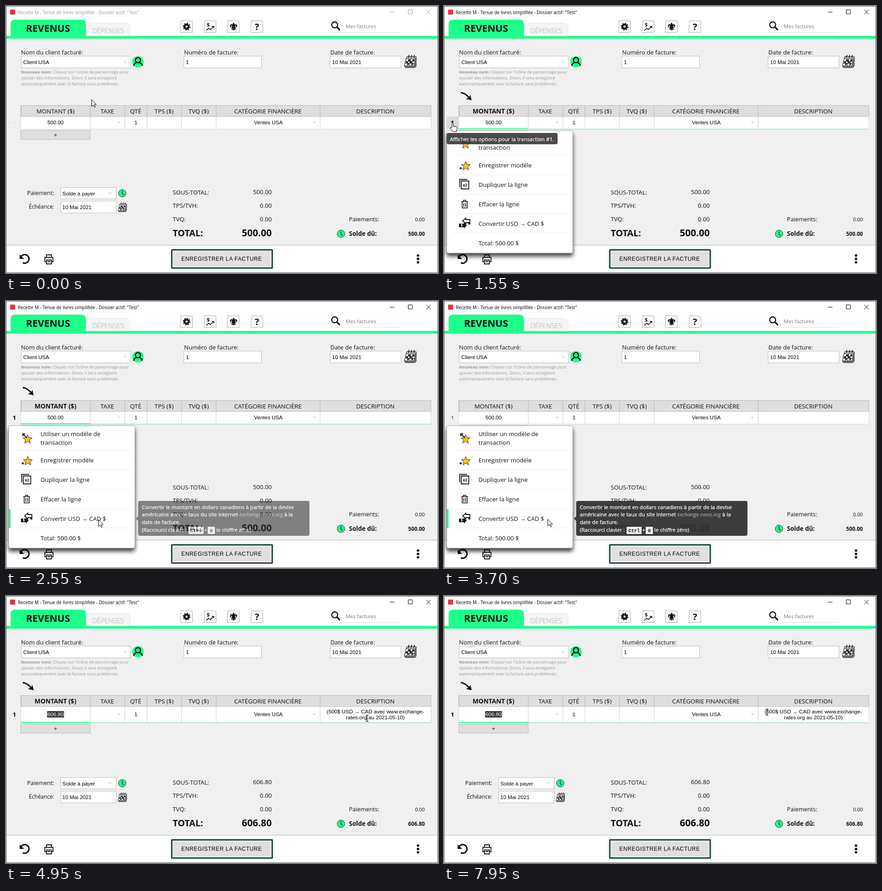
Animation, 951 px wide and 589 px high, one loop 8000 ms. Source, as an HTML page:

```html
<!DOCTYPE html>
<html lang="fr">
<head>
<meta charset="utf-8">
<title>Recette M</title>
<style>
html, body { margin: 0; width: 100%; height: 100%; overflow: hidden; background: #f0f0f0; }
svg { display: block; width: 951px; height: 589px; font: 13.2px "Open Sans", "Noto Sans", sans-serif; fill: #111; }
text { white-space: pre; }
.b { font-weight: 700; }
.m { text-anchor: middle; }
.e { text-anchor: end; }
.f { font: 11.7px "Liberation Sans", Arial, sans-serif; fill: #000; }
.box { fill: #fff; stroke: #bdbdbd; }
.grey { fill: #dedede; stroke: #b8b8b8; }
.ln { fill: none; stroke: #111; }
.tri { fill: #e2e2e2; }
.hint { font-size: 9.24px; fill: #999; }
.head { font-size: 13.4px; }
.tip { font-size: 11.58px; fill: #fff; }
.tip text:not(.key) { stroke: #fff; stroke-width: .3px; }
.tip .bg { fill: #313131; fill-opacity: .94; }
.tip .site { font-style: italic; fill: #bbb; stroke: none; }
.key { font: 700 10.5px "Liberation Mono", monospace; fill: #111; }
#row { stroke: #d8d8d8; }
#menu .sheet { filter: drop-shadow(0 7px 5px #000b); }
#button { filter: drop-shadow(0 0 2px #1dff8b); }
</style>
</head>
<body>
<svg viewBox="0 0 951 589">
  <defs>
    <path id="tri" class="tri" d="M-4 -2h8l-4 5z"/>
    <path id="star" d="M0-10 2.7-3.3 10-3 4.3 1.6 6.3 8.6 0 4.6-6.3 8.6-4.3 1.6-10-3-2.7-3.3z" fill="#ffc61a" stroke="#222"/>
    <g id="clock">
      <circle r="8.3" fill="#1dff8b" stroke="#234"/>
      <path d="M0-5.5V.5L3 4" class="ln" stroke-width="1.4"/>
    </g>
    <g id="calendar">
      <path d="M6 6H27V26L24 29H3L1 25z" fill="#777" stroke="#222"/>
      <path d="M6 5H27L22 25H1z" fill="#fff" stroke="#222"/>
      <path d="M6 5H27L26 9.500H5z" fill="#ccc" stroke="#222"/>
      <path d="M10 11h5l-1 4H9zM19 11h5l-1 4h-5zM13 15h5l-1 4h-5zM5 15h4l-1 4H4zM8 19h4l-1 4H7zM17 19h4l-1 4h-4z" fill="#222"/>
      <path d="M10 10 7 25M15 10 12 25M20 10 17 25M4 15H25M3 19.500H24" class="ln" stroke-width=".7"/>
      <path d="M10 7 11 1M16 7 17 1M22 7 23 1" class="ln" stroke-width="1.8"/>
    </g>
    <path id="frame" d="M1 0 26 1 27 26 0 27z" fill="#fbfbfb" stroke="#aaa"/>
  </defs>

  <!-- window -->
  <rect width="951" height="589" fill="#f0f0f0"/>
  <path d="M0 0H951V68H0zM0 528H951V589H0z" fill="#fff"/>
  <path d="M0 527.5H951" stroke="#b5b5b5"/>
  <path d="M0 66H951V72H0z" fill="#1dff8b"/>
  <rect x="9" y="8" width="11" height="11" fill="#e8323c"/>
  <g id="bar">
    <text x="26" y="17.5" font-size="9.9">Recette M - Tenue de livres simplifiée - Dossier actif: "Test"</text>
    <path d="M845 13.5H855M885.5 8.5H894.5V17.5H885.5zM925 8.5 935 18.5M935 8.5 925 18.5" fill="none" stroke="currentColor"/>
  </g>

  <!-- tabs and tools -->
  <path d="M177 66V46Q177 38 186 38H263Q273 38 273 48V66z" fill="#f5f5f5" stroke="#e6e6e6"/>
  <text x="190" y="60" font-size="14.7" font-weight="300" fill="#aaa">DÉPENSES</text>
  <path d="M10 67V40Q10 30 20 30H166Q176 30 176 40V67z" fill="#1dff8b"/>
  <text x="44" y="57" font-size="21.3" class="b">REVENUS</text>
  <use href="#frame" x="384" y="32"/><use href="#frame" x="436" y="32"/>
  <use href="#frame" x="487" y="32"/><use href="#frame" x="539" y="32"/>
  <g transform="translate(397.5 45.5)" class="ln">
    <circle r="4.4" stroke-width="4"/>
    <circle r="7" stroke-width="2.6" stroke-dasharray="3 2.5"/>
  </g>
  <text x="442" y="45" font-size="11" class="b">$</text>
  <path d="M441 54 446 49 450 52 457 45M453 45H457.5V49" class="ln" stroke-width="1.7"/>
  <g transform="translate(501 45.5)">
    <path d="M0-9Q6-2 1.500 3V8H-1.500V3Q-6-2 0-9z"/>
    <path d="M-3 3Q-1-4-5-4Q-8-3-6 1M3 3Q1-4 5-4Q8-3 6 1" class="ln" stroke-width="2.4"/>
    <path d="M-5 3H5M-2 5-4 7M2 5 4 7" class="ln" stroke-width="2"/>
  </g>
  <text x="552.5" y="53" font-size="20" class="b m">?</text>
  <circle cx="723.5" cy="41.5" r="6.5" class="ln" stroke-width="2.4"/>
  <path d="M728 46 735 53" class="ln" stroke-width="3.2"/>
  <text x="748" y="49" font-size="11.2" fill="#777">Mes factures</text>
  <path d="M713 58.5H868" stroke="#dedede"/>

  <!-- invoice fields -->
  <text x="33" y="107">Nom du client facturé:</text>
  <text x="392" y="107">Numéro de facture:</text>
  <text x="714" y="107">Date de facture:</text>
  <rect class="box" x="33.5" y="110.5" width="241" height="26"/>
  <rect class="box" x="391.5" y="110.5" width="171" height="26"/>
  <rect class="box" x="713.5" y="110.5" width="156" height="26"/>
  <text class="f" x="38" y="128">Client USA</text>
  <text class="f" x="396" y="128">1</text>
  <text class="f" x="718" y="128">10 Mai 2021</text>
  <use href="#tri" x="262" y="123"/>
  <circle cx="290.5" cy="123" r="12.6" fill="#1dff8b"/>
  <circle cx="290.5" cy="119.5" r="5.6" class="ln" stroke-width="2.6"/>
  <path d="M281 132Q282 126 287 125.5M300 132Q299 126 294 125.5" class="ln" stroke-width="2.6"/>
  <use href="#calendar" x="876" y="107"/>
  <text class="hint" x="33" y="149"><tspan class="b">Nouveau nom:</tspan> Cliquez sur l'icône de personnage pour</text>
  <text class="hint" x="33" y="162">ajouter des informations. Sinon, il sera enregistré</text>
  <text class="hint" x="33" y="175">automatiquement avec la facture sans problèmes.</text>

  <!-- table -->
  <g id="pointer">
    <path d="M37 191Q47 192 56 203" class="ln" stroke-width="3.2"/>
    <path d="M61 208 58 196 55 202 48 205z"/>
  </g>
  <rect class="grey" x="32.5" y="219.5" width="903" height="24"/>
  <g id="heads"></g>
  <rect id="row" class="box" x="32.5" y="244" width="903"/>
  <path id="grid" fill="none" stroke="#d0d0d0"/>
  <g id="focus">
    <path d="M185 271.5H935" stroke="#7fd6ac"/>
    <path d="M33 271H185" stroke="#1dff8b" stroke-width="2"/>
  </g>
  <rect id="hover" x="6" y="244" width="27" fill="#dadada"/>
  <text id="num" class="m" x="18.5">1</text>
  <g id="cells">
    <rect id="mark" x="90.5" y="250" width="37" height="14" fill="#333"/>
    <text id="amount" class="f m" x="109" y="261"></text>
    <text class="f m" x="286" y="261">1</text>
    <text class="f m" x="577.5" y="261">Ventes USA</text>
    <use href="#tri" x="249" y="257"/><use href="#tri" x="679" y="257"/>
  </g>
  <g id="desc">
    <text class="f m" x="813" y="259">(500$ USD → CAD avec www.exchange-</text>
    <text class="f m" x="813" y="272">rates.org au 2021-05-10)</text>
  </g>
  <g id="add">
    <rect class="grey" x="32.5" y="274.5" width="153" height="20"/>
    <text class="m" x="109" y="289">+</text>
  </g>

  <!-- payment and totals -->
  <text class="e" x="106" y="416.5" font-size="12.7">Paiement:</text>
  <text class="e" x="106" y="447" font-size="11.9">Échéance:</text>
  <rect class="box" x="120.5" y="400.5" width="122" height="25"/>
  <rect class="box" x="120.5" y="430.5" width="122" height="26"/>
  <text class="f" x="124" y="417.5">Solde à payer</text>
  <text class="f" x="124" y="448">10 Mai 2021</text>
  <use href="#tri" x="229" y="413"/>
  <use href="#clock" x="256" y="413"/>
  <use href="#calendar" transform="translate(246 433) scale(.72)"/>
  <text x="367" y="415.5">SOUS-TOTAL:</text>
  <text x="367" y="445">TPS/TVH:</text>
  <text x="367" y="475">TVQ:</text>
  <text x="367" y="508" font-size="19.8" class="b">TOTAL:</text>
  <text class="e sum" x="585" y="415"></text>
  <text class="e" x="585" y="445">0.00</text>
  <text class="e" x="585" y="474.5">0.00</text>
  <text class="e b sum" x="585" y="508" font-size="21"></text>
  <text x="755" y="475" font-size="12.9">Paiements:</text>
  <text class="e" x="922" y="475" font-size="10.8">0.00</text>
  <use href="#clock" x="737.5" y="502.5"/>
  <text x="755" y="507" font-size="13.5" class="b">Solde dû:</text>
  <text class="e b sum" x="922" y="507" font-size="11.7"></text>

  <!-- footer -->
  <path d="M33 553A9.5 9.5 0 1 1 37 566.5" class="ln" stroke-width="3.2"/>
  <path d="M30 548V558H40z"/>
  <path d="M89 554V549H100V554M88 564H85.5V554.5H103.5V564H101M89 560.5H100V569H89zM91 564H98" class="ln" stroke-width="1.8"/>
  <rect id="button" x="365" y="538" width="221" height="40" fill="#e0e0e0" stroke="#000" stroke-width="2"/>
  <text class="f" x="386" y="562" style="font-size:12px;letter-spacing:.65px">ENREGISTRER LA FACTURE</text>
  <circle cx="907" cy="550.5" r="2.8"/><circle cx="907" cy="558" r="2.8"/><circle cx="907" cy="565.5" r="2.8"/>
  <rect x=".5" y=".5" width="950" height="588" fill="none" stroke="#5a5a5a"/>

  <!-- row menu -->
  <g id="menu">
    <rect class="sheet" x="6" y="275" width="277.5" height="270" rx="4" fill="#fff" stroke="#aaa"/>
    <path d="M20 329.5H272M20 372.5H272M20 415.5H272M20 458.5H272M20 500.5H272" stroke="#ececec"/>
    <path id="item" fill="#1dff8b"/>
    <text x="76" y="298">Utiliser un modèle de</text>
    <text x="76" y="316.5">transaction</text>
    <text x="76" y="356">Enregistrer modèle</text>
    <text x="76" y="399">Dupliquer la ligne</text>
    <text x="76" y="442">Effacer la ligne</text>
    <text x="76" y="485">Convertir USD → CAD $</text>
    <text x="76" y="528">Total: 500.00 $</text>
    <use href="#star" x="47.5" y="305"/>
    <path d="M37 293 46 302M37 298V293H42" class="ln" stroke-width="2.2"/>
    <use href="#star" x="48" y="353"/>
    <path d="M34 358H40M37 355V361" class="ln" stroke-width="1.6"/>
    <path d="M34.5 400V382.5H51M38 386H54.5V403.5H38z" class="ln" stroke-width="1.8"/>
    <text x="46.3" y="398" font-size="8.5" class="b m">x2</text>
    <path d="M38 431.5H53M43 431V428.5H48V431M40 432V445.5H51V432M43.5 434.5V443M47.5 434.5V443" class="ln" stroke-width="1.6"/>
    <path d="M33 480H44V477L50 484 44 491V488H33z"/>
    <path d="M57 471H48V468L41 474 48 480V478H57z" fill="#fff" stroke="#111" stroke-width="1.8"/>
    <path d="M53 478H58V482H54"/>
    <text x="39" y="487" font-size="8" class="b m" fill="#fff">$</text>
  </g>

  <!-- tooltips -->
  <g id="tip1" class="tip">
    <rect class="bg" x="6" y="280" width="244" height="25" rx="4"/>
    <text x="13" y="297.5">Afficher les options pour la transaction #1.</text>
  </g>
  <g id="tip2" class="tip">
    <path class="bg" d="M295 441H664Q668 441 668 445V514Q668 518 664 518H295Q291 518 291 514V485L286 480 291 475V445Q291 441 295 441z"/>
    <text x="299" y="458.5">Convertir le montant en dollars canadiens à partir de la devise</text>
    <text x="299" y="475">américaine avec le taux du site internet <tspan class="site">exchange-rates.org</tspan> à la</text>
    <text x="299" y="492">date de facture.</text>
    <text x="299" y="509">(Raccourci clavier :</text>
    <path d="M402 498H435V514H402zM444 498H460V514H444z" fill="#eee"/>
    <text class="key m" x="418.5" y="509.5">Ctrl</text>
    <text class="m" x="439.5" y="509">+</text>
    <text class="key m" x="452" y="509.5">0</text>
    <text x="463" y="509">le chiffre zéro)</text>
  </g>

  <!-- mouse: arrow, hand, text bar -->
  <g id="mouse">
    <path d="M.5 .5V15.5L4 12.2 6.6 17.5 8.800 16.5 6.4 11.3H11z" fill="#fff" stroke="#000"/>
    <path d="M-1.5 9V.5Q-1.5-1 0-1T1.5 .5V6L9 7.5Q10 8 10 10L8.5 18H0L-5 11Q-6 9-4 8.5z" fill="#fff" stroke="#000"/>
    <path d="M-3-7H-1L0-6 1-7H3M0-6V6M-3 7H-1L0 6 1 7H3" fill="none" stroke="#000" stroke-width="1.2"/>
  </g>
</svg>
<script>
const $ = id => document.getElementById(id);
const set = (id, attrs) => { for (const k in attrs) $(id).setAttribute(k, attrs[k]); };
const show = (el, on) => { el.style.display = on ? '' : 'none'; };
const ramp = (t, a, b) => Math.min(1, Math.max(0, (t - a) / (b - a)));

const LOOP = 8000, FOCUS = 50, SELECT = 3200, BLUR = 3650, DONE = 4100;
const edges = [33, 185, 261, 310, 386, 462, 691, 935];
const titles = ['MONTANT ($)', 'TAXE', 'QTÉ', 'TPS ($)', 'TVQ ($)', 'CATÉGORIE FINANCIÈRE', 'DESCRIPTION'];
const items = [275, 330, 373, 416, 459, 501, 545];
// time, x, y of the pointer's hot spot
const track = [
  [0, 188, 206], [50, 188, 206], [500, 110, 232], [850, 38, 258], [1000, 19, 259], [2020, 19, 259],
  [2250, 110, 390], [2550, 203, 482], [2850, 213, 487], [3050, 214, 486], [3190, 214, 486],
  [3350, 228, 481], [3700, 228, 481], [3800, 250, 458], [4050, 255, 457], [4450, 772, 266],
  [4600, 795, 270], [4750, 795, 269], [4950, 795, 270], [5120, 795, 270], [5950, 173, 251],
  [6100, 102, 250], [6630, 102, 250], [7450, 698, 257], [7680, 698, 257], [7800, 711, 256], [8000, 711, 256]
];

$('heads').innerHTML = titles.map((s, i) =>
  `<path d="M${edges[i]}.5 220V244" stroke="#b8b8b8"/>
   <text class="head m" x="${(edges[i] + edges[i + 1]) / 2}" y="237">${s}</text>`).join('');
const firstHead = document.querySelector('.head');

function pointerAt(t) {
  const i = track.findIndex(p => p[0] > t);
  const [t0, x0, y0] = track[i - 1], [t1, x1, y1] = track[i];
  const k = ramp(t, t0, t1);
  return [x0 + (x1 - x0) * k, y0 + (y1 - y0) * k];
}

function draw(t) {
  const [x, y] = pointerAt(t);
  const done = t >= DONE, focused = t >= FOCUS && t < BLUR || done;
  const grow = done ? 8 : 0, bottom = 271 + grow;
  const value = done ? '606.80' : '500.00';

  $('bar').style.fill = $('bar').style.color = t < FOCUS ? '#999' : '#000';

  // active row
  show($('pointer'), focused);
  firstHead.style.fontWeight = focused ? 700 : 400;
  firstHead.style.fontSize = focused ? '13.8px' : '';
  set('row', { height: bottom - 243.5 });
  set('grid', { d: edges.slice(1, -1).map(e => `M${e}.5 244V${bottom}`).join('') });
  show($('focus'), focused);
  set('focus', { transform: `translate(0 ${grow})` });
  const start = done ? DONE : t >= BLUR ? BLUR : FOCUS;
  const ease = 1 - (1 - ramp(t, start, start + 350)) ** 3;
  const big = focused ? ease : t < FOCUS ? 0 : 1 - ease;
  const grey = Math.round(170 * (1 - big ** 3));
  $('num').style.cssText = `font-size:${7.5 + 5.5 * big}px;font-weight:${big > .2 ? 700 : 400};fill:rgb(${grey},${grey},${grey})`;
  set('num', { y: 260 + 2 * big + grow / 2 });
  const onNumber = x < 33 && y > 244 && y < bottom;
  show($('hover'), onNumber);
  set('hover', { height: bottom - 244 });

  // values
  const marked = done || t >= SELECT && t < BLUR;
  set('cells', { transform: `translate(0 ${grow / 2})` });
  show($('mark'), marked);
  $('amount').textContent = value;
  $('amount').style.fill = marked ? '#fff' : '#000';
  document.querySelectorAll('.sum').forEach(el => { el.textContent = value; });
  show($('desc'), done);
  set('add', { transform: `translate(0 ${grow})` });

  // menu and tooltips
  const menu = ramp(t, 1150, 1300) - ramp(t, DONE, DONE + 150);
  $('menu').style.opacity = menu;
  show($('menu'), menu > 0);
  const i = x > 6 && x < 284 ? items.findIndex((top, n) => y >= top && y < items[n + 1]) : -1;
  set('item', { d: i < 0 ? '' : `M6 ${items[i]}h4V${items[i + 1]}h-4z` });
  $('tip1').style.opacity = ramp(t, 1300, 1570) - ramp(t, 2050, 2250);
  $('tip2').style.opacity = ramp(t, 2370, 2660) - ramp(t, 3780, 4000);

  const shape = onNumber ? 1 : y > 244 && y < bottom && x >= 33 && x < 935 ? 2 : 0;
  set('mouse', { transform: `translate(${Math.round(x)} ${Math.round(y)})` });
  [...$('mouse').children].forEach((el, n) => show(el, n === shape));
}

const begin = performance.now();
function tick() {
  draw((performance.now() - begin) % LOOP);
  requestAnimationFrame(tick);
}
tick();
</script>
</body>
</html>
```
